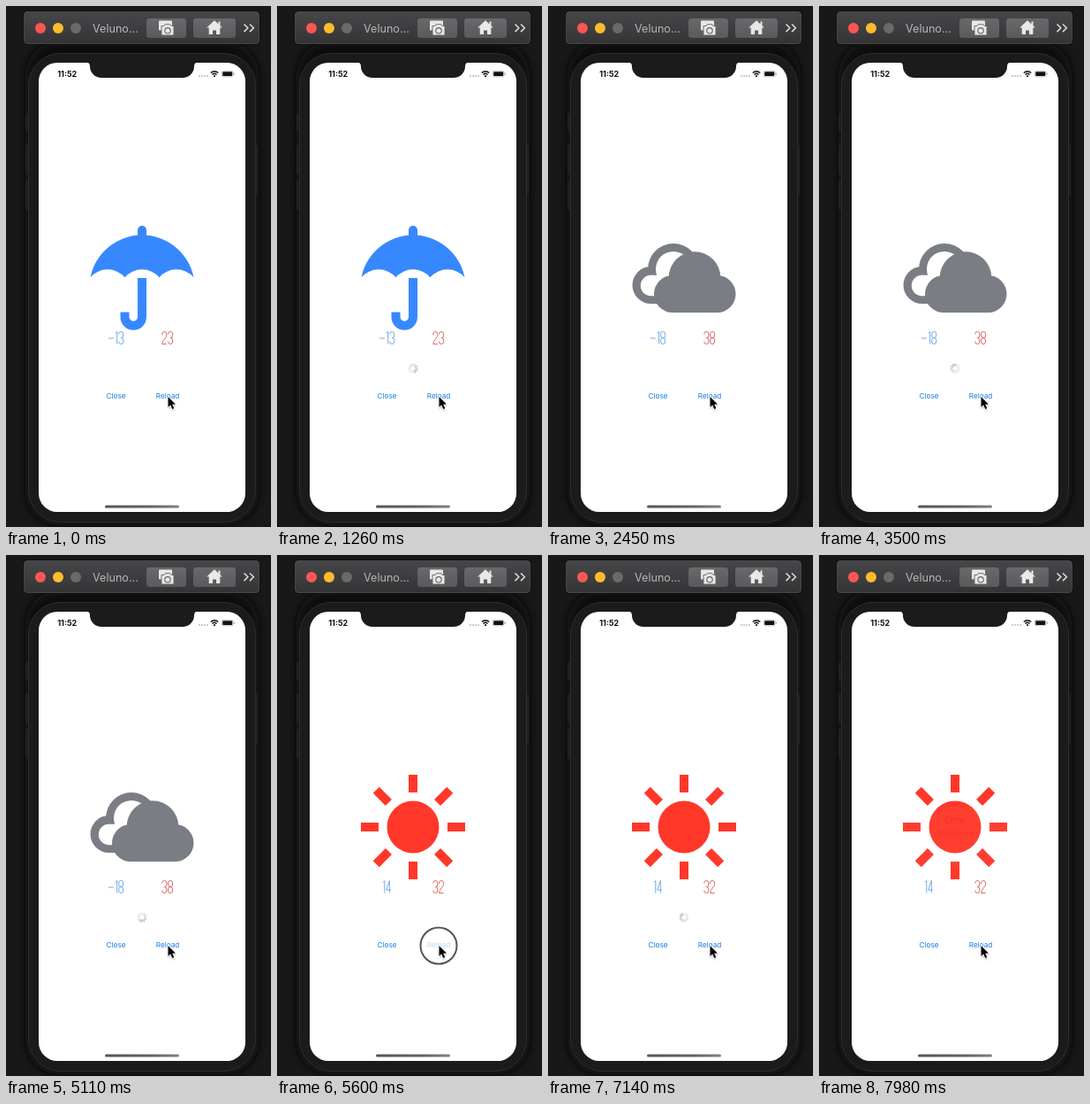
An HTML page for the animation above (8000 ms loop, 300x588 px).

```html
<!DOCTYPE html>
<html lang="en">
<head>
<meta charset="utf-8">
<title>Weather reload</title>
<style>
  html, body { margin: 0; width: 100%; height: 100%; overflow: hidden; background: #181818; }
  svg { display: block; width: 100vw; height: 100vh; }
  text { font-family: Inter, "Noto Sans CJK JP", "Noto Sans CJK", sans-serif; }
  .link { font-size: 8.2px; fill: #147ce0; text-anchor: middle; }
  .temp { fill: none; stroke-width: .75; stroke-linejoin: round; }
</style>
</head>
<body>
<svg viewBox="0 0 300 588">
  <defs>
    <linearGradient id="bar" x2="0" y2="1">
      <stop stop-color="#47474a"/><stop offset="1" stop-color="#343436"/>
    </linearGradient>
    <linearGradient id="key" x2="0" y2="1">
      <stop stop-color="#69696b"/><stop offset="1" stop-color="#5a5a5c"/>
    </linearGradient>
    <linearGradient id="home">
      <stop stop-color="#545652"/><stop offset=".6" stop-color="#5f635c"/><stop offset="1" stop-color="#80827e"/>
    </linearGradient>
    <filter id="blur" x="-20%" y="-20%" width="140%" height="140%"><feGaussianBlur stdDeviation="5"/></filter>
    <filter id="soft" x="-50%" y="-50%" width="200%" height="200%"><feGaussianBlur stdDeviation="1"/></filter>
  </defs>

  <rect width="300" height="588" fill="#181818"/>
  <rect x="22" y="40" width="264" height="546" rx="38" fill="#0c0c0c" filter="url(#blur)"/>

  <!-- toolbar -->
  <rect x="19.5" y="5.5" width="268" height="38" rx="4" fill="#0a0a0a"/>
  <rect x="20.5" y="6.5" width="266" height="36" rx="3.5" fill="url(#bar)" stroke="#565659" stroke-width=".7"/>
  <circle cx="39" cy="25" r="6" fill="#fc5753"/>
  <circle cx="59" cy="25" r="6" fill="#fdbc2f"/>
  <circle cx="79" cy="25" r="6" fill="#6a6a6a"/>
  <text x="98" y="29.7" font-size="12.6" fill="#b7b7b8">Veluno...</text>
  <rect x="159" y="14" width="45" height="22" rx="3.5" fill="url(#key)"/>
  <rect x="212" y="14" width="48" height="22" rx="3.5" fill="url(#key)"/>
  <g fill="#e8e8e8">
    <rect x="173" y="16.5" width="15" height="11" rx="1"/>
    <path d="M176 22.5h3l1.2-1.8h5.600l1.200 1.800h3v10.500h-14z" stroke="#636365" stroke-width=".9"/>
    <circle cx="183" cy="27.8" r="3.200" fill="none" stroke="#636365" stroke-width="1.100"/>
    <path d="M236 16.300l8.800 8.200h-2.500v7.500h-4.300v-4.500h-4v4.500h-4.300v-7.500h-2.500zM240.500 17.500h2v5h-2z"/>
  </g>
  <path d="M269.5 20.5l4.300 4.300-4.300 4.300M276 20.5l4.300 4.300-4.300 4.300" fill="none" stroke="#dedede" stroke-width="1.5"/>

  <!-- phone -->
  <g fill="#1d1d1d" stroke="#2c2c2c" stroke-width=".6">
    <rect x="22.5" y="121.5" width="5" height="19" rx="1.5"/>
    <rect x="22.5" y="157" width="5" height="33" rx="1.5"/>
    <rect x="22.5" y="196.5" width="5" height="33" rx="1.5"/>
    <rect x="280" y="157" width="4.5" height="56" rx="1.5"/>
  </g>
  <rect x="25.5" y="53.5" width="257" height="529" rx="36" fill="#1b1b1b" stroke="#2e2e2e"/>
  <rect x="37" y="64" width="234" height="507" rx="21" fill="#fff"/>
  <path d="M92 63.5q3 1 3 4.500a13 13 0 0 0 13 13h92a13 13 0 0 0 13-13q0-3.500 3-4.500z" fill="#1b1b1b"/>
  <text x="58.2" y="80" font-size="9" font-weight="700" fill="#111">11:52</text>
  <g fill="#b5b5b5">
    <circle cx="219" cy="79" r=".9"/><circle cx="222" cy="79" r=".9"/>
    <circle cx="225" cy="79" r=".9"/><circle cx="228" cy="79" r=".9"/>
  </g>
  <path d="M231.8 75.5a6 6 0 0 1 8.400 0M233.500 77.500a3.600 3.600 0 0 1 5 0" fill="none" stroke="#111" stroke-width="1.5"/>
  <circle cx="236" cy="79.2" r="1.1" fill="#111"/>
  <rect x="244.3" y="73.3" width="12.8" height="6.5" rx="1.8" fill="none" stroke="#999" stroke-width=".6"/>
  <rect x="245.2" y="74.2" width="11" height="4.7" rx="1" fill="#111"/>
  <rect x="257.7" y="75.5" width="1" height="2.2" fill="#999"/>
  <rect x="112" y="563.5" width="84" height="3" rx="1.5" fill="url(#home)"/>

  <!-- weather icons -->
  <g id="rain" fill="#3788ff">
    <path d="M149 262v-9a5 5 0 0 1 10 0v9z"/>
    <path d="M95.5 306.300a59.700 59.700 0 0 1 117 0a25.600 25.600 0 0 0-39 0a25.600 25.600 0 0 0-39 0a25.600 25.600 0 0 0-39 0z"/>
    <path d="M154 307V351a9.750 9.750 0 0 1-19.500 0V345.500" fill="none" stroke="#3788ff" stroke-width="10"/>
  </g>
  <g id="cloud" fill="#7b7d85">
    <circle cx="142" cy="297" r="29"/><circle cx="116.5" cy="315" r="21"/>
    <rect x="116" y="312" width="27" height="24"/>
    <g fill="#fff">
      <circle cx="142" cy="297" r="20"/><circle cx="116.5" cy="315.5" r="11.7"/>
      <rect x="116.5" y="303.8" width="26" height="23.4"/>
    </g>
    <circle cx="166" cy="306.5" r="29.3"/><circle cx="141" cy="325" r="21"/>
    <circle cx="191.500" cy="325" r="21"/>
    <rect x="141" y="318" width="50.5" height="28"/>
  </g>
  <g id="sun" fill="#ff3829"><circle cx="154" cy="307" r="29.5"/></g>

  <path id="low" class="temp" stroke="#4a90dc" role="img"/>
  <path id="high" class="temp" stroke="#cf3b3a" role="img"/>
  <g id="spinner" transform="translate(154 409)"></g>

  <text class="link" x="124.5" y="443.3">Close</text>
  <text class="link" id="reload" x="183" y="443.3">Reload</text>

  <g id="alert">
    <rect x="78" y="284" width="152" height="70" rx="8" fill="#fff" opacity=".6"/>
    <text x="154" y="302.5" font-size="10" font-weight="600" text-anchor="middle">Error</text>
    <text x="155" y="316.5" font-size="7.3" text-anchor="middle">取得失敗です</text>
  </g>

  <circle id="ring" cx="183" cy="441" r="20.5" fill="none" stroke="#555" stroke-width="2"/>
  <g transform="translate(183.5 441)">
    <path d="M0 1v12.500l3-2.500 2 4.800 2-.8-2-4.700h4z" opacity=".4" filter="url(#soft)"/>
    <path d="M0 0v11.700l2.700-2.500 2.100 4.800 2-.9-2.100-4.700h3.800z" stroke="#fff" stroke-width="1.600" paint-order="stroke"/>
  </g>
</svg>

<script>
const LOOP = 8000, TICK = 87.5, ALERT_AT = 7910;
const SVG = "http://www.w3.org/2000/svg";
const $ = id => document.getElementById(id);
const show = (id, on) => $(id).style.display = on ? "" : "none";

const scenes = [
  { from: 0, icon: "rain", low: "-13", high: "23" },
  { from: 2450, icon: "cloud", low: "-18", high: "38" },
  { from: 5250, icon: "sun", low: "14", high: "32" }
];

// press to release, then loading until end; lead is the first dark spoke
const loads = [
  { press: 210, start: 350, end: 2450, origin: 327.5, lead: 7 },
  { press: 3010, start: 3150, end: 5250, origin: 3092.5, lead: 8 },
  { press: 5600, start: 5810, end: 7910, origin: 5787.5, lead: 8 }
];

// tall thin numerals: width and relative strokes on a 14px height
const glyphs = {
  "-": [6, "m0 7.5h6"],
  1: [2.2, "m0 2l2-2v14"],
  2: [5, "m0 3.7v-1.2a2.5 2.5 0 0 1 5 0v1.5c0 3-5 5.5-5 10h5"],
  3: [5, "m0 3v-.5a2.5 2.5 0 0 1 5 0v2q0 2.5-2.5 2.5q2.5 0 2.5 2.5v2a2.5 2.5 0 0 1-5 0v-.5"],
  4: [5, "m3.5 14v-14l-3.5 10.5h5.2"],
  8: [5, "m2.5 0q2.5 0 2.5 2.5v2q0 2.5-2.5 2.5t-2.5-2.5v-2q0-2.5 2.5-2.5zm0 7q2.5 0 2.5 2.5v2q0 2.5-2.5 2.5t-2.5-2.5v-2q0-2.5 2.5-2.5z"]
};

function setTemp(id, value, center) {
  const gap = 1.8, chars = [...value];
  const width = chars.reduce((sum, c) => sum + glyphs[c][0] + gap, -gap);
  let x = center - width / 2, d = "";
  for (const c of chars) {
    d += `M${x} 367.5` + glyphs[c][1];
    x += glyphs[c][0] + gap;
  }
  $(id).setAttribute("d", d);
  $(id).setAttribute("aria-label", value);
}

function add(parent, name, attrs) {
  const el = document.createElementNS(SVG, name);
  for (const key in attrs) el.setAttribute(key, attrs[key]);
  return parent.appendChild(el);
}

for (let i = 0; i < 8; i++)
  add($("sun"), "rect", { x: 149, y: 248, width: 10, height: 20, transform: `rotate(${i * 45} 154 307)` });

const spokes = Array.from({ length: 12 }, (_, i) => add($("spinner"), "path", {
  d: "M0-3V-5.2", stroke: "#8c8c8c", "stroke-width": .9, "stroke-linecap": "round",
  transform: `rotate(${i * 30})`
}));

let current;
function setScene(scene) {
  if (scene === current) return;
  current = scene;
  for (const s of scenes) show(s.icon, s === scene);
  setTemp("low", scene.low, 124.3);
  setTemp("high", scene.high, 182.7);
}

function draw(t) {
  setScene(scenes.filter(s => s.from <= t).pop());

  const pressed = loads.some(l => t >= l.press && t < l.start);
  show("ring", pressed);
  $("reload").setAttribute("opacity", pressed ? .3 : 1);

  const load = loads.find(l => t >= l.start && t < l.end);
  show("spinner", load);
  if (load) {
    const head = Math.floor((t - load.origin) / TICK) + load.lead;
    spokes.forEach((s, i) => {
      const age = (head - i + 24) % 12;
      s.setAttribute("opacity", Math.max(.35, 1 - age * .09));
    });
  }

  show("alert", t >= ALERT_AT);
  $("alert").setAttribute("opacity", Math.max(0, t - ALERT_AT) * .0007);
}

const begin = performance.now();
function frame() {
  draw((performance.now() - begin) % LOOP);
  requestAnimationFrame(frame);
}
frame();
</script>
</body>
</html>
```
